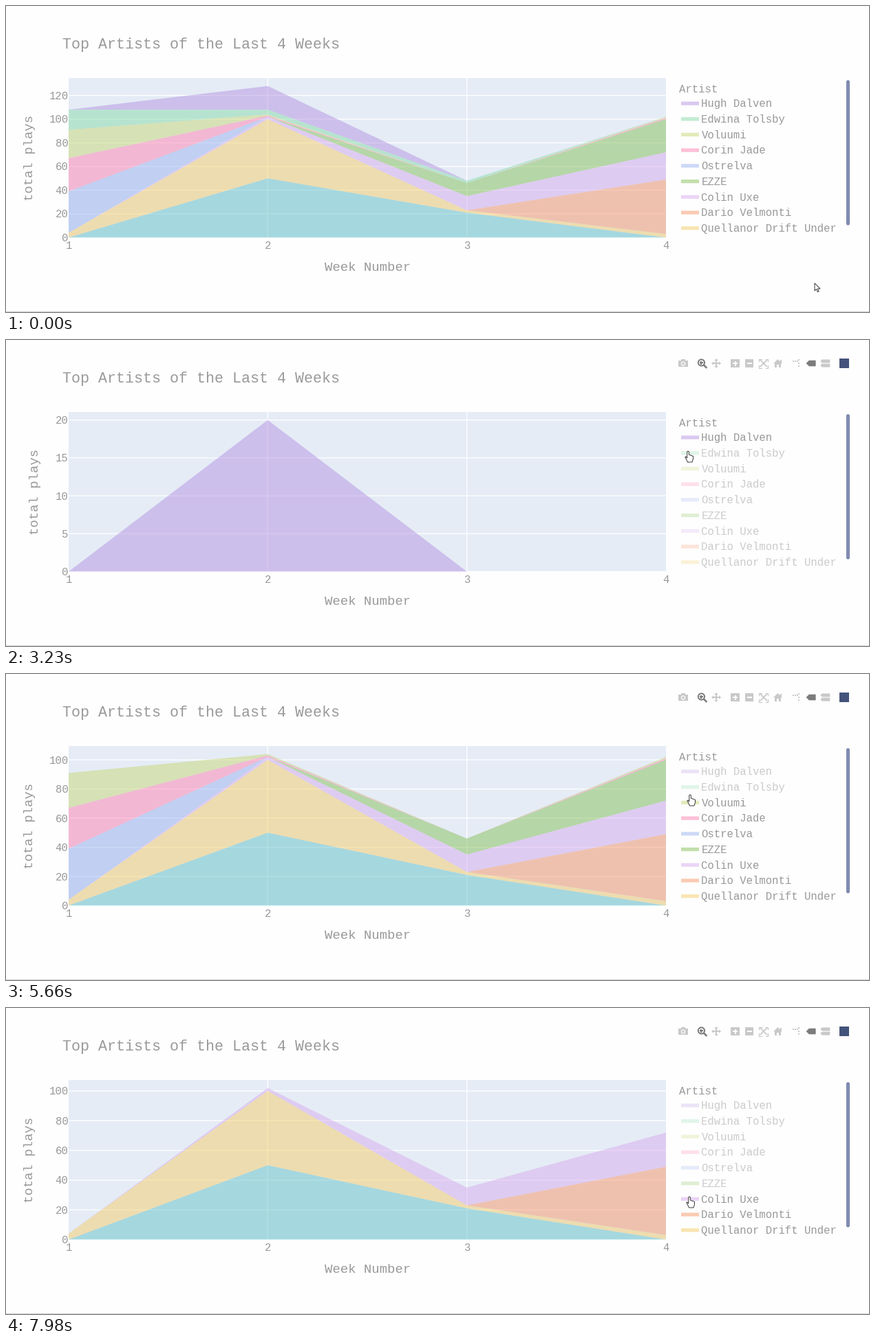
A matplotlib script that plays this animation: 1254 by 446 pixels, repeating every 8000 ms.

```python
import numpy as np
import matplotlib.pyplot as plt
from matplotlib.animation import FuncAnimation
from matplotlib.patches import Circle, FancyBboxPatch, Polygon, Rectangle

W, H, DPI = 1254, 446, 64
LOOP, STEP = 8000, 40
PT = 72 / DPI  # points per pixel

PAPER, PLOT = "#fefefe", "#e5ecf6"
INK, LIGHT, DARK = "#999999", "#c9c9c9", "#7c7c7c"
LEFT, RIGHT, TOP, BASE = 91, 959, 105, 337.5
ROW0, ROW_H = 142.2, 22.72
WEEKS_X = np.linspace(LEFT, RIGHT, 4)

# legend order, top of the stack first: name, colour, plays per week
SERIES = [
    ("Hugh Dalven", "#b594e2", (0, 20, 0, 0)),
    ("Edwina Tolsby", "#89dcaa", (17, 4, 2, 0)),
    ("Voluumi", "#c9d876", (24, 1, 0, 1)),
    ("Corin Jade", "#ff84b2", (28, 1, 0, 1)),
    ("Ostrelva", "#9db4f0", (35, 0, 0, 0)),
    ("EZZE", "#87c25a", (0, 0, 11, 28)),
    ("Colin Uxe", "#d9acee", (0, 2, 12, 23)),
    ("Dario Velmonti", "#f7986a", (0, 0, 0, 46)),
    ("Quellanor Drift Under", "#f5ce6a", (4, 50, 2, 3)),
    (None, "#67c4ca", (0, 50, 21, 0)),
]

# timeline in ms
BAR_ON = 70
SOLO = (1670, 3320)                           # one series alone, then all again
HIDES = (4560, 5490, 6420, 6830, 7440, 7900)  # series drop out from the top
PRESS, CLICK_LAG, DOUBLE_LAG = 75, 230, 390   # clicks come before their effect
CLICKS = ([t - CLICK_LAG for t in SOLO + HIDES]
          + [t - DOUBLE_LAG for t in SOLO])

# pointer: start point, then arrival time, glide time, legend row and x
START = (1175, 404)
STOPS = [(430, 400, 0, 1008), (670, 80, 0, 1003), (2610, 150, 1, 991),
         (3930, 150, 0, 993), (4800, 200, 1, 994), (5730, 200, 2, 994),
         (6340, 100, 3, 999), (7050, 200, 4, 994), (7520, 150, 5, 993),
         (7950, 150, 6, 993)]

ARROW = np.array([(0, 0), (0, 11), (2.6, 8.7), (4.4, 12.7), (6.2, 12),
                  (4.5, 8), (8, 8)])
HAND = np.array([(-1.3, 0.8), (0, 0), (1.3, 0.8), (1.3, 5), (7.5, 7.4),
                 (7.5, 11), (6, 16), (-0.5, 16), (-4.2, 8.4), (-3, 8),
                 (-1.3, 10)])

plt.rcParams["font.family"] = "Liberation Mono"
fig = plt.figure(figsize=(W / DPI, H / DPI), dpi=DPI, facecolor=PAPER)
ax = fig.add_axes([0, 0, 1, 1])
ax.set_xlim(0, W)
ax.set_ylim(H, 0)
ax.axis("off")


def rect(x, y, w, h, color, **kw):
    return ax.add_patch(Rectangle((x, y), w, h, fc=color, lw=0, **kw))


def box(x, y, w, h, color, **kw):
    return rect(x - w / 2, y - h / 2, w, h, color, **kw)


def poly(points, color, **kw):
    return ax.add_patch(Polygon(points, closed=True, fc=color, lw=0, **kw))


def disc(x, y, r, color, **kw):
    return ax.add_patch(Circle((x, y), r, fc=color, lw=0, **kw))


def line(xs, ys, color, width, **kw):
    return ax.plot(xs, ys, color=color, lw=width * PT, **kw)[0]


def rule(xs, ys):
    return line(xs, ys, "white", 1.3, zorder=1, snap=False,
                solid_capstyle="butt")


def label(x, y, text, size=15.65, **kw):
    return ax.text(x, y, text, fontsize=size * PT, color=INK, va="baseline", **kw)


# toolbar icons, each drawn around a centre
def camera(x, y):
    return [box(x, y + 0.5, 14, 9, LIGHT), box(x, y - 4.7, 6, 2, LIGHT),
            disc(x, y + 0.5, 3.2, PAPER), disc(x, y + 0.5, 1.9, LIGHT)]


def plus(x, y, size, color):
    return [box(x, y, size, 2, color), box(x, y, 2, size, color)]


def magnifier(x, y):
    x, y = x - 1, y - 1
    return [line([x + 3, x + 7], [y + 3, y + 7], DARK, 2.6, zorder=1),
            disc(x, y, 5.6, DARK), disc(x, y, 3.6, PAPER)] + plus(x, y, 5, DARK)


def pan(x, y):
    parts = plus(x, y, 10, LIGHT)
    for dx, dy in ((1, 0), (-1, 0), (0, 1), (0, -1)):
        tip, neck = np.array([(7 * dx, 7 * dy), (4 * dx, 4 * dy)]) + (x, y)
        side = 2.7 * np.array([dy, dx])
        parts.append(poly([tip, neck + side, neck - side], LIGHT))
    return parts


def zoom_in(x, y):
    return [box(x, y, 12.4, 12.4, LIGHT)] + plus(x, y, 7, PAPER)


def zoom_out(x, y):
    return [box(x, y, 12.4, 12.4, LIGHT), box(x, y, 7, 2, PAPER)]


def autoscale(x, y):
    parts = []
    for sx in (-1, 1):
        for sy in (-1, 1):
            us, vs = x + sx * np.array([3, 6.5, 6.5]), y + sy * np.array([6.5, 6.5, 3])
            parts += [line(us, vs, LIGHT, 1.2),
                      line([x, x + 4.5 * sx], [y, y + 4.5 * sy], LIGHT, 1.7)]
    return parts


def home(x, y):
    return [poly([(x - 6.5, y + 0.4), (x, y - 6), (x + 6.5, y + 0.4)], LIGHT),
            box(x + 4, y - 3.3, 2, 4, LIGHT), box(x, y + 2.8, 9, 5.6, LIGHT),
            box(x, y + 3.8, 2.4, 3.6, PAPER)]


def spikes(x, y):
    dots = [(x - 5 + 3.2 * k, y - 3.4) for k in range(3)]
    dots += [(x + 3.4, y - 5 + 4.7 * k) for k in range(3)]
    return [box(u, v, 2, 2, LIGHT) for u, v in dots]


def tag(x, y, half=4.3, color=DARK):
    neck = x - 7 + half
    return [poly([(x - 7, y), (neck, y - half), (x + 7, y - half),
                  (x + 7, y + half), (neck, y + half)], color)]


def two_tags(x, y):
    return tag(x, y - 3.1, 2.5, LIGHT) + tag(x, y + 3.1, 2.5, LIGHT)


def badge(x, y):
    return [box(x, y, 13.6, 13.8, "#44537b")]


def draw_toolbar():
    groups = [[camera], [magnifier, pan], [zoom_in, zoom_out, autoscale, home],
              [spikes, tag, two_tags], [badge]]
    parts, x = [], 984
    for group in groups:
        for icon in group:
            parts += icon(x, 34)
            x += 20.65
        x += 6.8
    return parts


# static parts
rect(0, 445, W, 1, "#d4d4d4")
rect(LEFT, TOP, RIGHT - LEFT, BASE - TOP, PLOT, zorder=0)
for x in WEEKS_X[1:3]:
    rule([x, x], [TOP, BASE])
for week, x in enumerate(WEEKS_X, 1):
    label(x, 354.5, str(week), ha="center")
label(82.5, 62, "Top Artists of the Last 4 Weeks", 21.6)
label(526, 386, "Week Number", 19, ha="center")
label(978, 125.5, "Artist")
ax.add_patch(FancyBboxPatch((1223.5, 110.7), 0.01, 206.3, fc="#808bb0", lw=0,
                            boxstyle="round,pad=2.6,rounding_size=2.6"))

# parts that follow the visible series
y_title = label(39, 221.5, "total plays", 19, ha="center", rotation=90,
                rotation_mode="anchor")
grid = [rule([LEFT, RIGHT], [0, 0]) for _ in range(7)]
ticks = [label(90.5, 0, "", ha="right") for _ in grid]
bands = [poly([(0, 0)] * 3, color, alpha=0.5, zorder=2) for _, color, _ in SERIES]
entries = []
for row, (name, color, _) in enumerate(SERIES[:-1]):
    y = ROW0 + row * ROW_H
    entries.append((box(994, y - 0.2, 26, 5.3, color, snap=False),
                    label(1010.5, y + 5, name)))

toolbar = draw_toolbar()
rings = [ax.add_patch(Circle((0, 0), r, fc="none", ec=c, lw=PT, zorder=9))
         for r, c in ((10, "black"), (9, "white"))]
cursor = ax.add_patch(Polygon(ARROW, closed=True, fc="white", ec="#3c3c3c",
                              lw=PT, joinstyle="round", zorder=10))


def visible_series(t):
    if SOLO[0] <= t < SOLO[1]:
        return {0}
    return set(range(sum(t >= h for h in HIDES), len(SERIES)))


def draw_chart(shown):
    peak = np.sum([SERIES[i][2] for i in shown], axis=0).max()
    scale = (BASE - TOP) * 0.95 / peak
    gap = 20 if peak > 40 else 5

    for n, (grid_line, text) in enumerate(zip(grid, ticks)):
        y = BASE - n * gap * scale
        for part in (grid_line, text):
            part.set_visible(y >= TOP)
        grid_line.set_ydata([y, y])
        text.set_y(y + 5.5)
        text.set_text(str(n * gap))
    y_title.set_x(39 if peak >= 100 else 47)

    floor = np.zeros(4)
    for i in reversed(range(len(SERIES))):
        bands[i].set_visible(i in shown)
        if i in shown:
            roof = floor + SERIES[i][2]
            ys = BASE - scale * np.concatenate([roof, floor[::-1]])
            bands[i].set_xy(np.column_stack([np.r_[WEEKS_X, WEEKS_X[::-1]], ys]))
            floor = roof

    for i, (swatch, text) in enumerate(entries):
        swatch.set_alpha(0.5 if i in shown else 0.25)
        text.set_alpha(1 if i in shown else 0.5)


def pointer_at(t):
    pos = np.array(START, float)
    for arrive, glide, row, x in STOPS:
        part = np.clip((t - arrive + glide) / glide, 0, 1)
        pos += part * (np.array([x, ROW0 + row * ROW_H - 3.2]) - pos)
    return np.round(pos)


def draw_pointer(t):
    x, y = pos = pointer_at(t)
    over_legend = 976 < x < 1215 and 131 < y < 335
    cursor.set_xy((HAND if over_legend else ARROW) + pos)
    pressed = any(c <= t < c + PRESS for c in CLICKS)
    for ring in rings:
        ring.set_center((x - 0.5, y + 0.5))
        ring.set_visible(pressed)


def update(i):
    t = (i + 0.5) * STEP
    for part in toolbar:
        part.set_visible(t >= BAR_ON)
    draw_chart(visible_series(t))
    draw_pointer(t)
    return []


anim = FuncAnimation(fig, update, frames=LOOP // STEP, interval=STEP,
                     init_func=lambda: update(0), repeat=True, repeat_delay=0,
                     blit=False, cache_frame_data=False)
plt.show()
```
